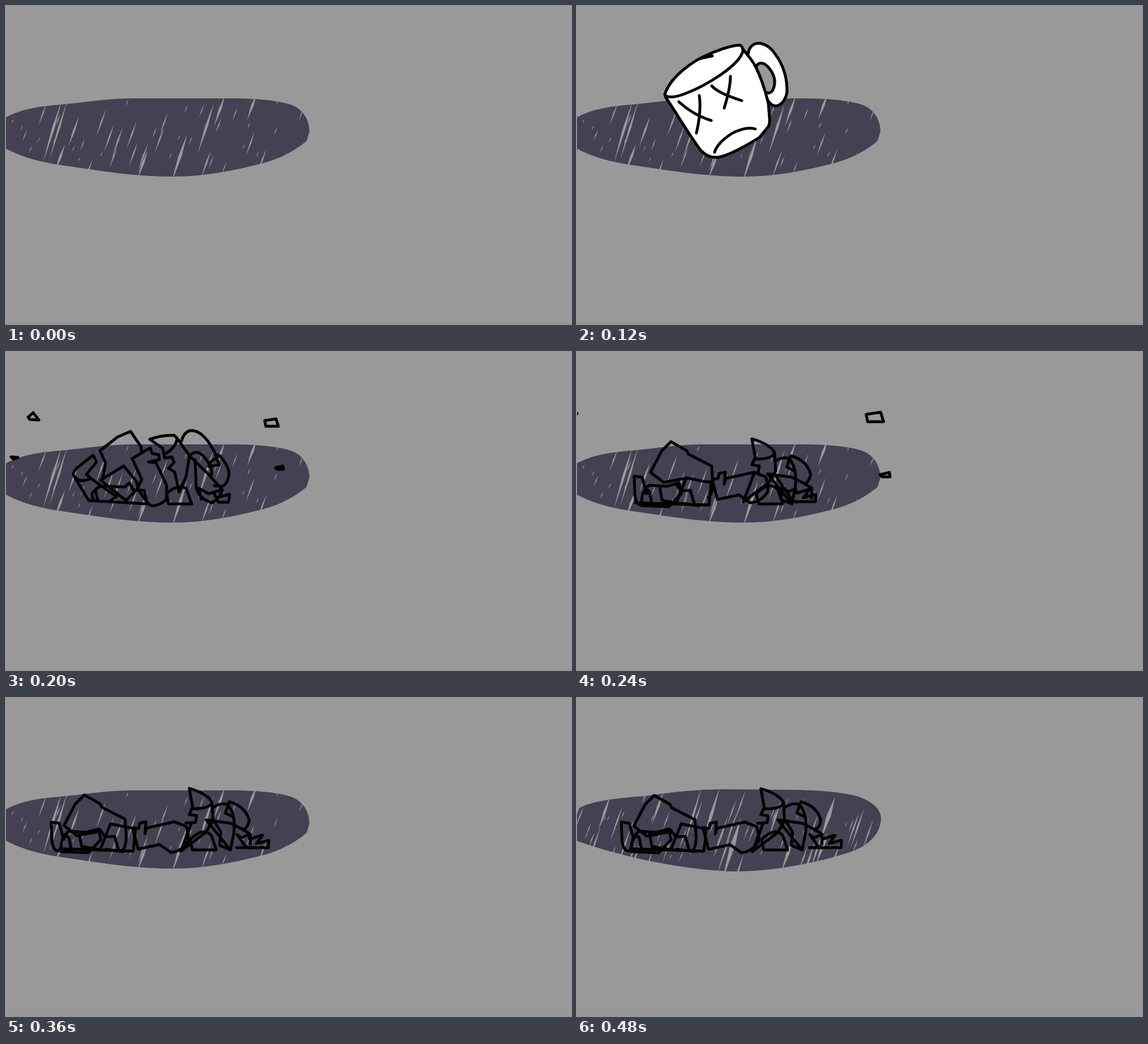
These frames come from a looping animation (998x561 px, 960 ms). An HTML page:

```html
<!DOCTYPE html>
<html lang="en">
<head>
<meta charset="utf-8">
<title>Falling mug</title>
<style>
  html, body { margin: 0; width: 100%; height: 100%; overflow: hidden; background: #999; }
  svg { display: block; width: 998px; height: 561px; }
  .ink { fill: none; stroke: #000; stroke-width: 5; stroke-linecap: round; stroke-linejoin: round; }
  .ink path { vector-effect: non-scaling-stroke; }
  .white { fill: #fff; }
</style>
</head>
<body>
<svg id="stage" viewBox="0 0 998 561"></svg>
<script>
const LOOP = 960;
const stage = document.getElementById('stage');

function add(parent, tag, attrs = {}) {
  const el = document.createElementNS('http://www.w3.org/2000/svg', tag);
  for (const key in attrs) el.setAttribute(key, attrs[key]);
  return parent.appendChild(el);
}
const group = (cls = '') => add(stage, 'g', { class: cls });
const path = (parent, d, cls = '') => add(parent, 'path', { d, class: cls });

let seed = 11;
const rand = (lo, hi) => {
  seed = (seed * 16807) % 2147483647;
  return lo + (hi - lo) * seed / 2147483647;
};

// A slanted sliver: top point, height, greatest width; short ones lean more.
function sliver(x, y, h, w) {
  const dx = -h * (0.41 - h * 0.001);
  const mx = x + dx * 0.45, my = y + h * 0.45;
  return `M${x},${y}L${mx + w / 2},${my}L${x + dx},${y + h}L${mx - w / 2},${my}Z`;
}

// Slivers spread evenly across the puddle, mostly short and thin.
function scatter(count, longest, widest) {
  return Array.from({ length: count }, (_, i) => {
    const size = rand(0, 1) ** 2;
    const x = 8 + 520 * (i + rand(0, 1)) / count;
    return sliver(x, rand(162, 280), 9 + longest * size, 1.5 + widest * size);
  });
}

function puddle(outline, slivers) {
  const g = group();
  add(g, 'path', { d: outline, fill: '#444153' });
  add(g, 'path', { d: slivers.join(''), fill: '#999' });
  return g;
}

const puddleA = puddle(
  'M-5,199C20,185 45,178 95,174C150,169 175,163 230,163L400,163C450,163 485,168 503,174' +
  'C525,182 535,200 536,221L531,238C510,255 490,267 455,277C400,291 350,301 295,301' +
  'C225,301 160,290 93,280C55,274 25,266 -5,249Z',
  [
    sliver(98, 168, 108, 5), sliver(108, 168, 104, 4), sliver(129, 195, 53, 4),
    sliver(104, 244, 48, 5), sliver(191, 208, 51, 3), sliver(250, 255, 50, 5),
    sliver(320, 226, 86, 6), sliver(367, 172, 90, 5), sliver(387, 157, 56, 5),
    sliver(443, 154, 47, 5), ...scatter(44, 45, 1.7)
  ]);
const puddleB = puddle(
  'M-3,214L4,194C25,183 60,177 120,173C170,166 210,161 270,161L380,162C440,163 475,167 500,175' +
  'C526,185 537,198 537,213C536,240 515,260 485,271C425,291 345,306 280,306' +
  'C190,304 80,281 -3,251Z',
  [
    sliver(59, 172, 62, 5), sliver(153, 164, 60, 5), sliver(220, 158, 108, 4),
    sliver(252, 158, 104, 6), sliver(290, 210, 110, 9), sliver(381, 250, 56, 6),
    sliver(456, 174, 76, 8), sliver(442, 238, 56, 6), ...scatter(70, 75, 2.3)
  ]);

// Whole mug
const mug = group('ink');
add(mug, 'path', {
  class: 'white', 'fill-rule': 'evenodd',
  d: 'M302,92C301,72 312,64 325,66C344,71 349,84 357,95C368,115 371,132 371,152' +
     'C368,168 358,178 348,176Q342,174 337,166ZM316,108C320,98 330,99 338,108' +
     'C350,122 352,135 346,148Q342,156 332,152Z'
});
path(mug, 'M156,160C175,188 195,222 213,247C222,261 233,268 248,267C266,265 300,246 322,232' +
  'L337,214Q341,209 340,197L338,172C333,150 321,112 308,95L293,76Z', 'white');
path(mug, 'M155,156C165,125 205,95 240,82C260,74 275,69 288,69Q293,71 293,80' +
  'C286,105 230,140 190,155C175,161 158,163 155,156Z', 'white');
path(mug, 'M216,93L239,88M224,90L237,86' +
  'M180,169Q205,192 237,202M216,158Q220,185 211,224' +
  'M238,141C248,152 270,160 291,167M271,124Q271,145 260,180' +
  'M243,258Q248,241 275,224Q300,212 315,217');

// Moment of breaking
const crack = group('ink');
path(crack, [
  'M154,182L126,204Q118,212 119,217L146,262L250,268M119,217Q128,233 150,223L195,255L184,263',
  'M154,182L160,194L142,216L150,223',
  'M239,178V168L220,140L197,150L166,174L176,196L171,221',
  'M167,226L208,201L230,228L234,240L212,262Z',
  'M156,262Q150,254 153,248L158,243L165,237L210,238L218,231L225,244H244L250,268M158,243L162,262',
  'M223,188L255,169L258,179L270,181L271,190L252,194L265,195L284,236L283,261Q267,273 257,271' +
    'Q250,269 232,240L240,225Z',
  'M254,154Q275,146 297,147L302,152Q301,169 279,181M254,154L277,170L280,187L293,185L297,195' +
    'L287,205L298,212L306,247L318,220L324,183L302,152',
  'M287,268L284,250Q300,233 318,240L328,268Z',
  'M310,157Q316,136 332,139Q352,143 370,180L378,183Q392,200 394,212Q393,232 382,237L368,236' +
    'M370,180L376,199L358,202L362,193L378,183',
  'M324,183Q337,170 350,185Q368,207 362,218M324,183L356,214L382,243M334,190L336,240',
  'M336,240Q342,260 365,266L377,255L382,243L358,250L340,240L345,260M368,250L375,265H393L395,251L375,256'
].join(''));

const chips = group('ink');
path(chips, 'M39,115L48,107L58,120L42,119ZM9,185L21,186L13,189Z' +
  'M457,121L477,118L481,131L459,131ZM476,204L489,201L490,207L479,207Z');

// Pieces sliding apart
const rubble = group('ink');
const pieces = [];
function piece(vx, vy, d) {
  pieces.push({ el: path(rubble, d), vx, vy });
}
piece(-10, 0, 'M110,250L102,221L88,219L89,250Q91,270 101,270');
piece(-8, 0, 'M104,271L152,273L174,250L170,231L148,237L117,235Q104,246 104,262' +
  'M107,250Q114,238 118,248L121,264M136,240L140,262L170,267');
piece(-13, 6, 'M136,238L113,220L133,182L149,166L177,182L180,188L221,209L223,240Q222,262 215,264' +
  'M136,238L172,231');
piece(-4, 0, 'M170,267L188,222L222,229L232,229L228,270L98,266' +
  'M178,245L195,244L202,268M170,233L178,245M210,271L180,267');
piece(-7, 3, 'M230,229L240,227L242,218L253,216L251,237L254,227L303,216L324,224' +
  'Q331,246 326,253Q315,268 297,270L277,256L239,264Z');
piece(7, 3, 'M312,218L329,217L331,205L318,203L324,190L318,157Q349,166 358,181Q357,193 322,193' +
  'M358,181L360,214L347,235L303,268L322,218');
piece(4, 0, 'M326,268L322,250Q346,226 360,243L368,268Z');
piece(8, 0, 'M360,193Q372,184 385,188Q400,205 396,238L390,268L347,215L390,221L412,232L425,240' +
  'V258M360,216L373,236L371,260L390,268');
piece(8, 0, 'M395,210L381,203L388,183Q416,191 423,215Q422,228 412,233');
piece(20, 0, 'M391,264H447L448,251L426,257L437,242L414,249L412,241L399,247L392,241L406,261L414,265');

add(stage, 'rect', { y: 560, width: 998, height: 1, fill: '#929292' });

const show = (el, on) => { el.style.display = on ? '' : 'none'; };
const place = (el, transform) => el.setAttribute('transform', transform);
const scaleAt = (x, y, sx, sy) => `translate(${x} ${y}) scale(${sx} ${sy}) translate(${-x} ${-y})`;

// Stretched in the air (-1), plain on landing (0), squashed (1)
function fall(t) {
  const k = Math.floor((t - 80) / 40) - 1;
  place(mug, `translate(0 ${90 * Math.min(k, 0)}) ` + scaleAt(250, 267, 1 + 0.11 * k, 1 - 0.2 * k));
}

// The slide slows down exponentially and is held for 80 ms a pose.
function slide(t) {
  const pose = t < 280 ? 240 : Math.min(440, t - (t - 280) % 80);
  const k = 1 - Math.exp((280 - pose) / 48);
  for (const { el, vx, vy } of pieces) place(el, `translate(${vx * k} ${vy * k})`);
}

function draw(t) {
  show(puddleA, t < 480);
  show(puddleB, t >= 480);
  show(mug, t >= 80 && t < 200);
  show(crack, t >= 200 && t < 240);
  show(chips, t >= 200 && t < 280);
  show(rubble, t >= 240);
  const spread = t < 240 ? 1 : 1.28;
  place(chips, scaleAt(265, 160, spread, spread));
  fall(t);
  slide(t);
}

const begin = performance.now();
function tick() {
  draw((performance.now() - begin) % LOOP);
  requestAnimationFrame(tick);
}
tick();
</script>
</body>
</html>
```
